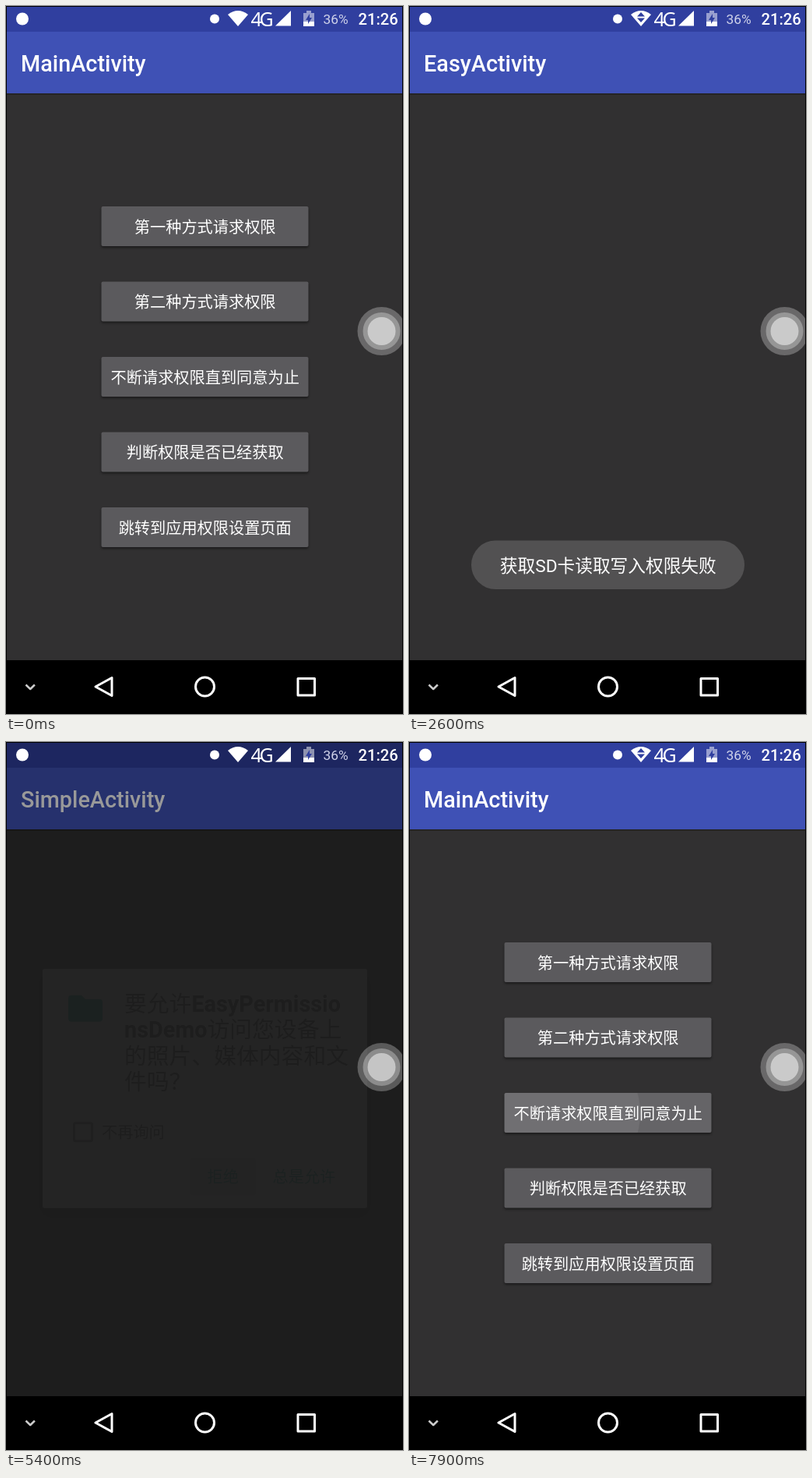
Animation of 510x908 px, one loop 8 s. Source, as an HTML page:

```html
<!DOCTYPE html>
<html lang="zh-CN">
<head>
<meta charset="utf-8">
<title>Permission requests</title>
<style>
  html, body { margin: 0; height: 100%; overflow: hidden; background: #000; }
  svg { display: block; width: 100vw; height: 100vh; }
  text { font-family: Roboto, "Noto Sans CJK SC", "Noto Sans CJK", sans-serif; font-size: 20.2px; fill: #fff; }
  .title { font-size: 28.8px; font-weight: 500; }
  .button { fill: #5b5a5d; filter: drop-shadow(0 2px 1.5px rgba(0, 0, 0, .45)); }
  .question text { font-size: 28.8px; fill: #222; }
  .question tspan { font-weight: 700; }
  .action { fill: #009688; font-weight: 500; }
  .keys { fill: none; stroke: #fff; stroke-width: 3; stroke-linejoin: round; }
</style>
</head>
<body>
<svg viewBox="0 0 510 908">
  <defs>
    <g id="window">
      <rect width="510" height="839" fill="#313031"/>
      <rect y="112" width="510" height="2" opacity=".25"/>
      <rect width="510" height="112" fill="#3f51b5"/>
      <rect width="510" height="33" fill="#303f9f"/>
    </g>
    <clipPath id="buttonClip"><rect x="122.5" width="266" height="51" rx="2"/></clipPath>
  </defs>
  <rect width="510" height="908"/>

  <use href="#window"/>
  <text class="title" x="19" y="84">MainActivity</text>
  <g id="buttons"></g>
  <g id="ripple" clip-path="url(#buttonClip)" fill="#fff">
    <rect x="122" width="267" height="52" opacity=".06"/>
    <circle id="wave" cx="205" cy="26" opacity=".07"/>
  </g>
  <g id="labels" text-anchor="middle"></g>

  <g id="activity">
    <use href="#window"/>
    <text class="title" id="activityTitle" x="19" y="84"></text>
  </g>
  <rect id="dim" width="510" height="839"/>

  <g id="dialog">
    <rect x="47" width="417" height="307" rx="3" fill="#fcfafc" style="filter:drop-shadow(0 8px 9px rgba(0,0,0,.4))"/>
    <path d="M84 34h13l5 5h18q4 0 4 4v21q0 4-4 4H84q-4 0-4-4V38q0-4 4-4z" fill="#009688"/>
    <g class="question">
      <text x="152" y="55">要允许<tspan>EasyPermissio</tspan></text>
      <text x="152" y="88.5"><tspan>nsDemo</tspan>访问您设备上</text>
      <text x="152" y="122">的照片、媒体内容和文</text>
      <text x="152" y="155.5">件吗？</text>
    </g>
    <rect x="87.5" y="198" width="23" height="23" rx="2" fill="none" stroke="#6b6a6b" stroke-width="3"/>
    <text x="123" y="217" style="fill:#222">不再询问</text>
    <rect id="denyPress" x="237" y="243" width="84" height="48" rx="3" opacity=".12"/>
    <text class="action" x="258.5" y="274.5">拒绝</text>
    <text class="action" x="342.5" y="274.5">总是允许</text>
  </g>

  <g id="toast">
    <rect x="80" y="685.5" width="351" height="62.5" rx="31.2" fill="#525152"/>
    <text x="255.8" y="726" text-anchor="middle" style="font-size:22.7px">获取SD卡读取写入权限失败</text>
  </g>

  <g id="bubble" fill="#fff">
    <circle cx="482.5" cy="417" r="31" opacity=".27"/>
    <circle cx="482.5" cy="417" r="24" opacity=".3"/>
    <circle cx="482.5" cy="417" r="18" opacity=".5"/>
  </g>

  <g fill="#fff">
    <circle cx="21" cy="16.5" r="8"/>
    <circle cx="268" cy="16.5" r="6"/>
    <path d="M285 11Q298 1 311 11L298 26z"/>
    <path id="traffic" d="M298 8l5 5.500h-10zM298 21l5-5.500h-10z" fill="#303f9f"/>
    <g style="font:25px 'Noto Sans',sans-serif">
      <text x="314.500" y="26" style="font:inherit">4</text>
      <text x="325.500" y="26" style="font:inherit">G</text>
    </g>
    <path d="M366 6V25.500H346z"/>
    <path d="M386 6h6v3h4v17h-14V9h4z" opacity=".5"/>
    <path d="M382 20h14v6h-14z"/>
    <path d="M390 10l-5 8h3v5l5-8h-3z" fill="#303f9f"/>
    <text x="407.500" y="23" style="font-size:17.3px;fill:#d0d3ea">36%</text>
    <text x="452.500" y="23.500" style="font-size:20.2px;font-weight:500">21:26</text>
  </g>

  <ellipse id="backPress" cx="125" cy="873" rx="45" ry="33" fill="#fff"/>
  <g class="keys">
    <path d="M25.500 870.500l5.700 5.500 5.700-5.500" stroke="#ccc" stroke-width="2.500"/>
    <path d="M115 873l21-11.500v23z"/>
    <circle cx="255.500" cy="873" r="12"/>
    <rect x="375" y="862.500" width="21.500" height="21.500"/>
  </g>
  <rect x=".5" y=".5" width="509" height="907" fill="none" stroke="#000"/>
</svg>
<script>
const LOOP = 8000, TICK = 100;
const captions = ["第一种方式请求权限", "第二种方式请求权限", "不断请求权限直到同意为止", "判断权限是否已经获取", "跳转到应用权限设置页面"];
const visits = [
  { title: "EasyActivity", open: 1031, close: 1950, back: 2880, toastEnd: 4080 },
  { title: "SimpleActivity", open: 4041, close: 5250, back: 6480, toastEnd: 7280 },
];
const presses = [{ start: 700, row: 0 }, { start: 3750, row: 1 }, { start: 7840, row: 2 }];

const el = id => document.getElementById(id);
const ramp = (t, start, length) => Math.max(0, Math.min(1, (t - start) / length));
const rowY = row => 257 + 96.5 * row;
const show = (id, opacity) => el(id).setAttribute("opacity", opacity);
const moveY = (id, y) => el(id).setAttribute("transform", `translate(0 ${y})`);

captions.forEach((caption, row) => {
  el("buttons").innerHTML += `<rect class="button" x="122.5" y="${rowY(row)}" width="266" height="51" rx="2"/>`;
  el("labels").innerHTML += `<text x="255.7" y="${rowY(row) + 33.5}">${caption}</text>`;
});

function drawRipple(t) {
  const press = presses.find(p => t > p.start && t < p.start + 450);
  show("ripple", press ? 1 - ramp(t, press.start + 300, 150) : 0);
  if (!press) return;
  moveY("ripple", rowY(press.row));
  el("wave").setAttribute("r", 190 * Math.sqrt(ramp(t, press.start, 100)) - 55);
}

function drawVisit(t) {
  const visit = visits.find(v => t >= v.open && t < v.back + 250);
  if (!visit) {
    ["activity", "dim", "dialog"].forEach(id => show(id, 0));
    show("bubble", 1);
    return;
  }
  const { title, open, close, back } = visit;
  const settle = (1 - ramp(t, open, 350)) ** 5;
  const closing = ramp(t, close, 155);

  el("activityTitle").textContent = title;
  moveY("activity", 72 * (settle + ramp(t, back, 250) ** 4));
  show("activity", (1 - (1 - ramp(t, open, 200)) ** 4) * (1 - ramp(t, back + 100, 150)));

  show("dim", .6 * ramp(t, open, 200) * (1 - ramp(t, close + 83, 200)));
  moveY("dialog", 283 + 63 * settle + 8 * closing);
  show("dialog", (1 - (1 - ramp(t, open, 190)) ** 2) * (1 - closing));
  show("denyPress", t >= close - 50 ? .12 : 0);
  show("bubble", t > close + 100 ? 1 : 0);
}

function draw(t) {
  drawRipple(t);
  drawVisit(t);
  show("toast", Math.max(...visits.map(v => ramp(t, v.close + 300, 300) * (1 - ramp(t, v.toastEnd, 400)))));
  show("backPress", .15 * Math.max(...visits.map(v => ramp(t, v.back - 130, 100) * (1 - ramp(t, v.back + 60, 250)))));
  show("traffic", (t >= 2500 && t < 2900) || t >= 7800 ? 1 : 0);
}

function frame() {
  draw(Math.floor(performance.now() % LOOP / TICK) * TICK);
  requestAnimationFrame(frame);
}
frame();
</script>
</body>
</html>
```
